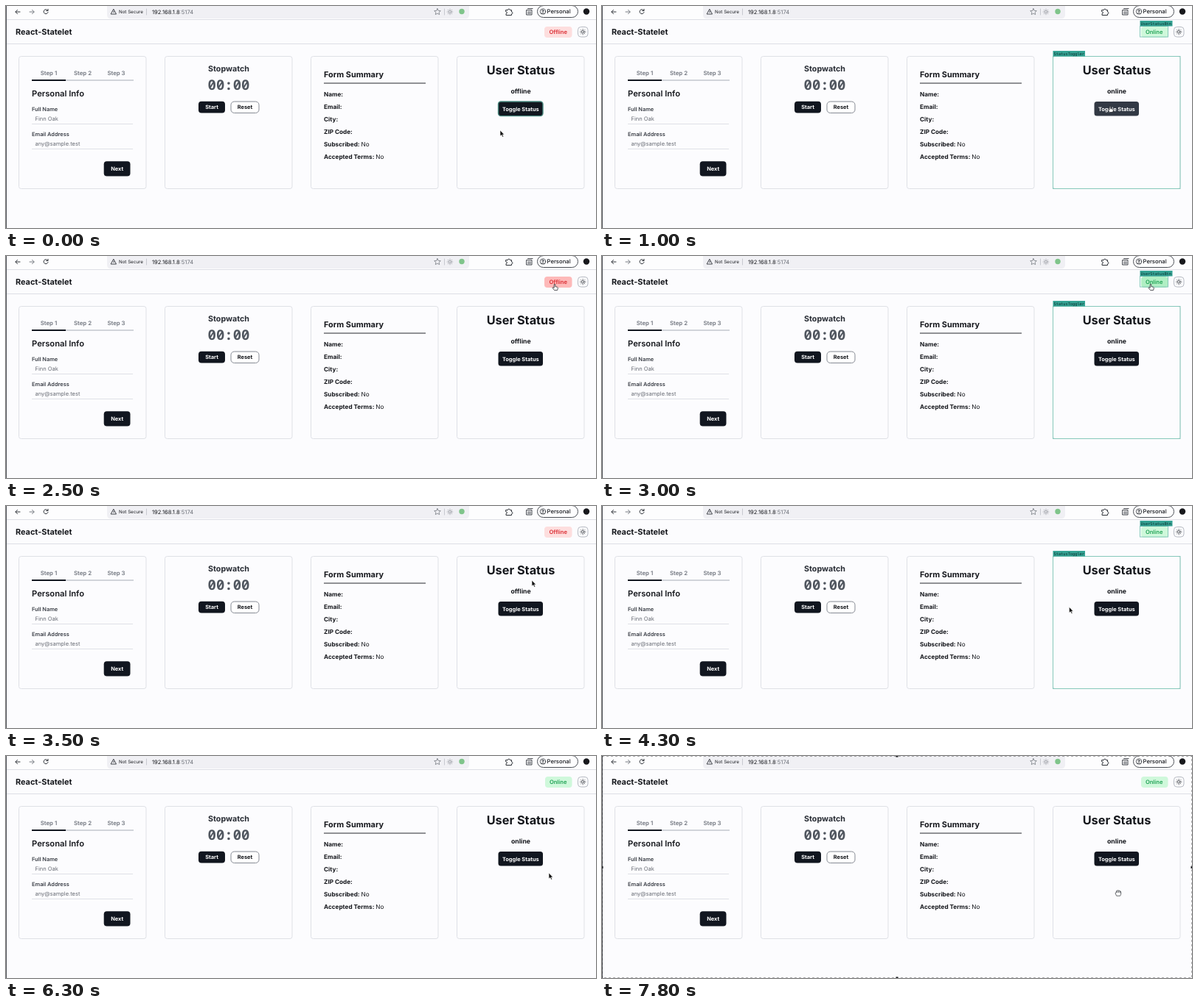
Animation, 800 px wide and 302 px high, one loop 8000 ms. Source, as an HTML page:

```html
<!DOCTYPE html>
<html lang="en">
<head>
<meta charset="utf-8">
<title>React-Statelet demo</title>
<style>
  html, body { margin: 0; width: 100%; height: 100%; overflow: hidden; background: #fcfcfe; }
  svg { display: block; width: 100%; height: 100%; }
  text { font-family: Inter, "Open Sans", sans-serif; font-weight: 700; fill: #15171c; text-rendering: geometricPrecision; }
  .mid { text-anchor: middle; }
  .btn { font-size: 7.4px; text-anchor: middle; }
  .light { fill: #fff; }
  .step { font-size: 7.8px; font-weight: 600; fill: #70757e; text-anchor: middle; }
  .label { font-size: 7.4px; font-weight: 600; fill: #3a3e46; }
  .hint { font-size: 7.5px; font-weight: 400; fill: #686c74; }
  .row { font-size: 8.2px; }
  .plain { font-weight: 400; }
  .dark { fill: #11161f; }
  .card { fill: #fcfcfe; stroke: #dfe1e6; }
  .line { fill: none; stroke: #30343a; stroke-width: 1; stroke-linecap: round; stroke-linejoin: round; }
  .mark rect { fill: none; stroke: #86c8ba; }
  .mark .tag { fill: #35a394; stroke: none; }
  .mark text { font: 5.3px "DejaVu Sans Mono", monospace; fill: #0d3330; }
</style>
</head>
<body>
<svg viewBox="0 0 800 302" preserveAspectRatio="none">
  <rect width="800" height="302" fill="#fcfcfe"/>

  <!-- browser bar -->
  <rect width="800" height="19" fill="#fdfdfe"/>
  <path d="M137 0H628V12Q628 17 623 17H142Q137 17 137 12Z" fill="#f0f0f4"/>
  <g class="line">
    <path d="M19 8H13M15.500 5.300 12.800 8l2.700 2.700"/>
    <path d="M32 8h6M35.500 5.300 38.200 8l-2.700 2.700" stroke="#777b82"/>
    <path d="M56.600 6A3 3 0 1 0 57 8.500M57 4.300V6.500H54.800"/>
    <path d="M146 4.500 149.500 11H142.500ZM146 7v1.700" stroke-width=".9"/>
    <path d="M190.500 4V12" stroke="#c7c9cf"/>
    <path d="M585 3.500l1.300 2.800 3 .3-2.200 2 .6 3-2.700-1.500-2.700 1.500.6-3-2.200-2 3-.3Z" stroke="#777b82" stroke-width=".8"/>
    <path d="M594.500 4V12" stroke="#c7c9cf"/>
    <path d="M678 5.500h2.500a1.400 1.400 0 0 1 2.800 0H685.500V8a1.400 1.400 0 0 1 0 2.800V12.500H678V10.500a1.400 1.400 0 0 0 0-2.800Z"/>
    <path d="M706 5.500H713V12H706ZM707.500 3.500H714M707.500 8h4M707.500 10h4" stroke-width=".9"/>
    <rect x="720.500" y="-.5" width="55" height="16" rx="8" stroke="#4b4f56"/>
    <circle cx="728" cy="7.500" r="3.700" stroke-width=".8"/>
    <circle cx="728" cy="6.500" r="1.200" stroke-width=".8"/>
    <path d="M725.700 10.200q2.300-2.200 4.600 0" stroke-width=".8"/>
  </g>
  <use href="#sun" x="602" y="8" stroke="#8b8f96"/>
  <circle cx="618" cy="7.500" r="3.700" fill="#7fc48a"/>
  <circle cx="787" cy="7.500" r="4.200" fill="#17181c"/>
  <text x="153" y="10.300" font-size="6.200" style="font-weight:400">Not Secure</text>
  <text x="198" y="10.500" font-size="7.600" style="font-weight:400">192.168.1.8<tspan fill="#6b6f77">:5174</tspan></text>
  <text x="733.500" y="10.300" font-size="7.700" style="font-weight:500">Personal</text>
  <path d="M0 18.500H800M0 51.500H800" stroke="#dddfe5"/>

  <!-- page header -->
  <text x="13" y="39" font-size="10.900">React-Statelet</text>
  <rect id="badge" y="28" height="15" rx="4"/>
  <text id="badgeText" class="mid" x="748.700" y="38.200" font-size="7.600" style="font-weight:600"></text>
  <rect x="775.500" y="28.500" width="13.500" height="13.500" rx="4" fill="#fcfcfe" stroke="#b6bac2"/>
  <defs>
    <g id="sun" fill="none" stroke-width=".8" stroke-linecap="round">
      <circle r="1.700"/>
      <path d="M0-3.700v.8M0 3.700v-.8M-3.700 0h.8M3.700 0h-.8M-2.600-2.600l.5.5M2.600 2.600l-.5-.5M-2.600 2.600l.5-.5M2.600-2.600l-.5.5"/>
    </g>
  </defs>
  <use href="#sun" x="782.200" y="35.200" stroke="#30343a"/>

  <g id="cards"></g>

  <!-- form -->
  <text class="step" x="58" y="94">Step 1</text>
  <text class="step" x="104" y="94">Step 2</text>
  <text class="step" x="149.500" y="94">Step 3</text>
  <path d="M81 101H173" stroke="#d1d4da" stroke-width="2"/>
  <path d="M35 101H81" stroke="#11161f" stroke-width="2"/>
  <text x="35" y="122.700" font-size="11.200" style="font-weight:600">Personal Info</text>
  <text class="label" x="35" y="142.700">Full Name</text>
  <text class="hint" x="39.500" y="155.700">Finn Oak</text>
  <text class="label" x="35" y="176.700">Email Address</text>
  <text class="hint" x="39.500" y="189.700">any@sample.test</text>
  <path d="M35 160.500H172M35 194.500H172" stroke="#dfe1e6"/>
  <rect class="dark" x="132.700" y="211.300" width="35.800" height="20.200" rx="4"/>
  <text class="btn light" x="150.700" y="224.300">Next</text>

  <!-- stopwatch -->
  <text class="mid" x="302" y="88.700" font-size="10.700" style="fill:#272b33">Stopwatch</text>
  <text class="mid" x="302" y="114" style="font:600 19px 'Noto Sans Mono','DejaVu Sans Mono',monospace;fill:#50565f">00:00</text>
  <rect id="run" class="dark" y="129.700" height="15.800" rx="4"/>
  <text id="runText" class="btn light" y="140.400"></text>
  <rect id="reset" y="130" height="15.500" rx="4.500" fill="#fff" stroke="#858a93"/>
  <text id="resetText" class="btn" y="140.400">Reset</text>

  <!-- summary -->
  <text x="431" y="97.300" font-size="10.900">Form Summary</text>
  <path d="M431 105H569" stroke="#24272d"/>
  <g id="rows"></g>

  <!-- status -->
  <text class="mid" x="698" y="92.800" font-size="16.300">User Status</text>
  <text id="status" class="mid" x="698" y="118.800" font-size="8.700"></text>
  <rect id="toggle" x="667.500" y="130" width="60.500" height="19.600" rx="3.500" stroke="#4a8a80"/>
  <text class="btn light" x="697.800" y="142.700">Toggle Status</text>

  <!-- render marks -->
  <g id="statusMark" class="mark">
    <rect x="611.500" y="68.500" width="172.500" height="180"/>
    <rect class="tag" x="611.500" y="61" width="43.500" height="7.500"/>
    <text x="612.500" y="66.500">StatusToggler</text>
    <rect x="729.500" y="27.500" width="38" height="14.500"/>
    <rect class="tag" x="729.500" y="20" width="44" height="7.500"/>
    <text x="730.500" y="25.500">UserStatusBtn</text>
  </g>
  <g id="watchMark" class="mark">
    <rect x="215.500" y="68.500" width="172.500" height="180"/>
    <rect class="tag" x="215.500" y="61" width="50" height="7.500"/>
    <text x="216.500" y="66.500">SampleStopwatch</text>
  </g>

  <path d="M.5 0V302" stroke="#55585e"/>

  <g id="frame" fill="none" stroke="#17181c">
    <rect width="800" height="302" stroke-dasharray="3 3" stroke-opacity=".7"/>
    <path d="M398.500 .5h3M398.500 301.500h3M.5 150v3M799.500 150v3" stroke-width="2"/>
  </g>

  <!-- pointers -->
  <path id="arrow" d="M0 0V8L1.900 6.400 3.300 9.300 4.600 8.600 3.300 5.900H5.600Z" fill="#111" stroke="#fff" stroke-width=".6"/>
  <path id="hand" d="M-.9.800Q0-.5.900.800V4L4 4.800Q5 5.200 4.800 6.500L4 9.500H-.5L-3.200 6.200Q-3.300 4.800-2 5.200L-.9 6.200Z" fill="#fff" stroke="#16181c" stroke-width=".8" stroke-linejoin="round"/>
  <path id="grab" d="M-2.500 4.500-4 1.200Q-4.500-.5-2.800 0V-2.200Q-2.300-3.500-1.200-2.800-.3-4.300.7-2.900 2-3.700 2.500-2.200 4-2.500 4 0 4 3 2.700 4.500ZM-1.200-2.800V0M.7-2.900V0M2.500-2.200V.3" fill="#fff" stroke="#3a3d43" stroke-width=".8" stroke-linejoin="round"/>
</svg>
<script>
const LOOP = 8000, STEP = 100, MARK = 400;
const DARK = '#11161f', HOVER = '#323944';
const el = id => document.getElementById(id);
const set = (id, attrs) => {
  for (const k in attrs) el(id).setAttribute(k, attrs[k]);
};
const show = (id, on) => { el(id).style.display = on ? '' : 'none'; };

el('cards').innerHTML = [17.5, 215.5, 413.5, 611.5]
  .map(x => `<rect class="card" x="${x}" y="68.5" width="172.5" height="180" rx="3"/>`).join('');

el('rows').innerHTML = ['Name:', 'Email:', 'City:', 'ZIP Code:', 'Subscribed: No', 'Accepted Terms: No']
  .map((s, i) => `<text class="row" x="431" y="${123.3 + i * 16.9}">${s.replace('No', '<tspan class="plain">No</tspan>')}</text>`)
  .join('');

// time, x, y of the pointer tip
const path = [
  [0, 670, 169], [300, 672, 167], [400, 672, 167], [800, 689, 136], [1700, 689, 136],
  [2300, 744, 38], [3200, 744, 38], [3500, 713, 101], [3900, 697, 137], [4200, 697, 137],
  [4600, 290, 139], [4700, 290, 139], [4900, 274.5, 138.5], [6000, 274.5, 138.5],
  [6300, 736, 159], [6600, 700, 182], [LOOP, 700, 182]
];
const toggles = [900, 1600, 2700, 3100, 4000];
const runs = [4900, 5500];

function pointer(t) {
  const i = path.findIndex(p => p[0] > t);
  const [t0, x0, y0] = path[i - 1], [t1, x1, y1] = path[i];
  const u = (t - t0) / (t1 - t0), e = u * u * (3 - 2 * u);
  return [x0 + (x1 - x0) * e, y0 + (y1 - y0) * e];
}
const odd = (times, t) => times.filter(c => c <= t).length % 2 === 1;
const recent = (times, t) => times.some(c => t >= c && t < c + MARK);

function draw(t) {
  const [x, y] = pointer(t);
  const over = (l, top, r, b) => x >= l && x <= r && y >= top && y <= b;
  // the badge colour trails its text by one step
  const online = odd(toggles, t), green = odd(toggles, t - STEP);
  const running = odd(runs, t);
  const onBadge = over(730, 28, 767, 43);
  const onToggle = over(668, 130, 728, 150);
  const onRun = over(260, 130, 299, 146);
  const onButton = onBadge || onToggle || onRun;

  el('status').textContent = online ? 'online' : 'offline';
  el('badgeText').textContent = online ? 'Online' : 'Offline';
  set('badge', {
    x: online ? 731 : 730, width: online ? 36.5 : 37.5,
    fill: green ? (onBadge ? '#b0efc4' : '#cff8db') : (onBadge ? '#fdb9b9' : '#fddede')
  });
  el('badgeText').style.fill = green ? '#22a356' : '#dc2f35';
  set('toggle', { fill: onToggle ? HOVER : DARK, 'stroke-width': t < toggles[0] ? 1.4 : 0 });

  const runX = running ? 259.5 : 261, runW = running ? 39 : 36;
  const resetX = running ? 306.5 : 305;
  el('runText').textContent = running ? 'Pause' : 'Start';
  set('run', { x: runX, width: runW });
  el('run').style.fill = onRun ? HOVER : DARK;
  set('runText', { x: runX + runW / 2 });
  set('reset', { x: resetX, width: 38 });
  set('resetText', { x: resetX + 19 });

  show('statusMark', recent(toggles, t));
  show('watchMark', recent(runs, t));

  const grabbing = t >= 7600;
  show('frame', t >= 7700);
  show('grab', grabbing);
  show('hand', !grabbing && onButton);
  show('arrow', !grabbing && !onButton);
  const at = `translate(${x} ${y})`;
  set('hand', { transform: at + ' scale(.9)' });
  set('arrow', { transform: at });
  set('grab', { transform: `translate(${x} ${y + 4}) scale(.95)` });
}

const start = performance.now();
function tick() {
  const t = (performance.now() - start) % LOOP;
  draw(Math.floor(t / STEP) * STEP);
  requestAnimationFrame(tick);
}
tick();
</script>
</body>
</html>
```
